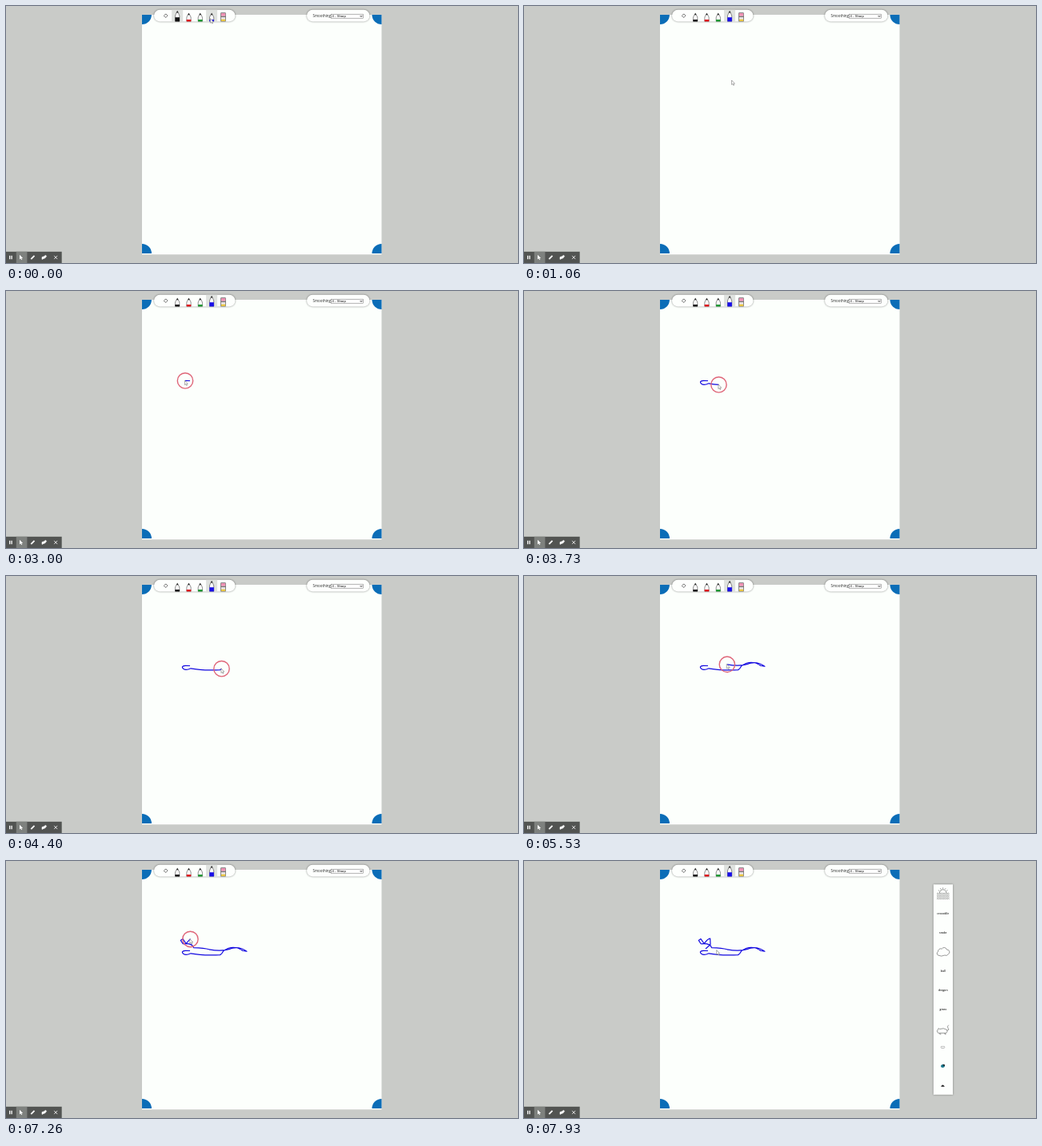
An HTML page that plays this animation: 640 by 322 pixels, repeating every 8 s.

```html
<!DOCTYPE html>
<html lang="en">
<head>
<meta charset="utf-8">
<title>Whiteboard sketch</title>
<style>
html, body { margin: 0; width: 100%; height: 100%; overflow: hidden; background: #c9cbc8; }
svg { display: block; width: 100vw; height: 100vh; }
.ui { font: 4.4px "Open Sans", sans-serif; fill: #222; }
.option { font: 4.2px "Liberation Sans", Arial, sans-serif; fill: #111; }
.word { font: 600 3.4px "Open Sans", sans-serif; fill: #222; text-anchor: middle; }
.shadow { filter: drop-shadow(0 .8px 1px #0007); }
.thin { fill: none; stroke: #444; stroke-width: .55; }
.ink { fill: none; stroke: #1208e0; stroke-width: 1.2; stroke-linejoin: round; }
</style>
</head>
<body>
<svg viewBox="0 0 640 322">
  <rect width="640" height="322" fill="#c9cbc8"/>
  <rect x="170" y="11" width="299.5" height="300.3" fill="#fcfffc"/>
  <g id="corners" fill="#0b6db7"></g>

  <rect class="shadow" x="185" y="4.8" width="101.5" height="14.6" rx="7.3" fill="#fdfffd"/>
  <g id="pens"></g>
  <g id="move" fill="none" stroke="#222" stroke-width=".7"></g>
  <g>
    <rect x="268.7" y="8.7" width="5.8" height="10.4" fill="#e9e4e6" stroke="#444" stroke-width=".6"/>
    <rect x="269" y="9" width="5.2" height="3.6" fill="#ef91b4"/>
    <rect x="268.6" y="12.8" width="6" height="1.1" fill="#666"/>
    <rect x="269" y="16.7" width="5.2" height="2.2" fill="#eac63c"/>
  </g>

  <rect class="shadow" x="376" y="4.8" width="78.5" height="14.6" rx="7.3" fill="#fdfffd"/>
  <text class="ui" x="383.6" y="14.3">Smoothing</text>
  <rect x="406.4" y="10.2" width="40.2" height="5" fill="#fff" stroke="#666" stroke-width=".5"/>
  <text class="option" x="407.6" y="14.2">4 - Sharp</text>
  <path d="M442.6 12l1.4 1.5 1.4-1.5" fill="none" stroke="#111" stroke-width=".8"/>

  <g>
    <rect y="307.8" width="69.7" height="14.2" fill="#525452"/>
    <rect x="12.8" y="307.8" width="13.6" height="14.2" fill="#7e817e"/>
    <path d="M4.7 312.7v4.6M7.1 312.7v4.6" stroke="#fff" stroke-width="1.3"/>
    <path d="M17 311.8v5.7l1.4-1.2 1 2 .9-.5-.9-1.9h1.7z" fill="#fff"/>
    <path d="M31.3 317.2l4.2-4.4" stroke="#fff" stroke-width="1.8"/>
    <path d="M45 317.4v-2.8l2.2-.7 2.4-1.6 1 1.2-1.6 2.2-2 .7z" fill="#fff" stroke="#fff" stroke-width=".6"/>
    <path d="M60.2 312.9l4 4.2M64.2 312.9l-4 4.2" stroke="#eee" stroke-width=".9"/>
  </g>

  <g id="panel">
    <rect class="shadow" x="511.8" y="29.3" width="24.3" height="263.5" fill="#fdfffd"/>
    <g class="thin">
      <path d="M519.5 40a4.2 4.2 0 0 1 8.4 0"/>
      <path id="rays"/>
      <path id="waves"/>
      <path d="M518 118.2a2.5 2.5 0 0 1-.4-4.6a3.4 3.4 0 0 1 4.7-3.5a3.4 3.4 0 0 1 6.2 1a3 3 0 0 1 2 5.5a4 4 0 0 1-4.8 1.5q-4 2-7.7.1z"/>
      <path d="M517 214.8q-1.5-2 .3-3.4q.5-3 2.2-.8q5-2 9 .8q1.5 2.5-.8 4.3h-9.5zM529 212.5q3.5-1 1-3.2q-1.5-2 .8-3.7M519.8 215.8v1.2h1.6M526 215.8v1.2h1.6M518.3 213h.5"/>
      <path d="M521.5 232.3h4l.5 1.3-1 .9h-3l-1-.8z" style="stroke:#888"/>
    </g>
    <path d="M521.2 256l2-1.3 2.5.3v3l-2 1-2.5-.7z" fill="#18758a"/>
    <path d="M523.5 254.7l2.4.4v2.1l-1.4-.6z" fill="#222"/>
    <path d="M521.2 282.8q2-4.5 4.7 0z" fill="#222"/>
    <g id="words"></g>
  </g>

  <g id="ink"></g>
  <circle id="press" r="9.7" fill="none" stroke="#df6578" stroke-width="1.4"/>
  <path id="cursor" d="M0-1v5.6l1.3-1 .9 1.9.9-.4-.9-1.9h1.7z" fill="#fff" stroke="#777" stroke-width=".6"/>
</svg>
<script>
const LOOP = 8000, STEP = LOOP / 120;
const SELECT_AT = 600, PANEL_AT = 7860;
const el = id => document.getElementById(id);
const repeat = (n, draw) => Array.from({ length: n }, (_, i) => draw(i)).join("");

// Each leg of the pointer's journey; the pen is down on the inked ones.
const legs = [
  { from: 600, to: 1060, d: "M256 16L260.8 105" },
  { from: 1260, to: 1800, d: "M260.8 105L231 112.5" },
  { name: "mouth", from: 2800, to: 3000, ink: true, d: "M230 112.5L224 112.4" },
  { name: "jaw", from: 3000, to: 4400, ink: true, d: "M224 112.4Q218 113 222 116.5Q225 118.5 231 115.8Q245 118.5 267.5 117.7L269.5 116.2" },
  { name: "tail", from: 4400, to: 5530, ink: true, d: "M269.5 116.2L272 112.5Q284 104 296 112.5L301 113.2Q292 107 283 109.2Q271 114 254 110.8" },
  { name: "back", from: 5530, to: 6600, ink: true, d: "M254 110.8Q248 109 234.5 108.6Q233 102.5 221.3 103.8" },
  { name: "ear", from: 6600, to: 7660, ink: true, d: "M221.3 103.8L218.3 99.5L221 97.6L225.2 103.5Q230 97 232.7 97.2L233 104.6L227 110" },
  { from: 7660, to: 7930, d: "M227 110L241.3 112" }
];

for (const leg of legs) {
  leg.path = document.createElementNS("http://www.w3.org/2000/svg", "path");
  leg.path.setAttribute("d", leg.d);
  leg.path.setAttribute("class", "ink");
  leg.length = leg.path.getTotalLength();
  if (leg.ink) el("ink").append(leg.path);
}

function pen(x, color, selected, lit) {
  const tip = selected ? 6 : 8.8, shoulder = selected ? 12 : 14, cap = selected ? 14.2 : 17;
  return (lit ? `<rect x="${x - 7}" y="4.8" width="14" height="14.6" fill="#dfe2df"/>` : "") +
    `<path d="M${x - 2.6} 19.2V${shoulder}L${x - .6} ${tip + 1.2}h1.2L${x + 2.6} ${shoulder}V19.2z" fill="#fff" stroke="#444" stroke-width=".6"/>` +
    `<path d="M${x - 1.2} ${tip + 2.4}L${x} ${tip - .3}L${x + 1.2} ${tip + 2.4}z" fill="#222"/>` +
    `<rect x="${x - 2.8}" y="${cap}" width="5.6" height="${19.4 - cap}" fill="${color}"/>`;
}

function pens(blue) {
  return ["#111", "#e0131c", "#229a35", "#1a10e8"].map((color, i) =>
    pen(214.2 + 14.3 * i, color, i === (blue ? 3 : 0), i === 3 || (i === 0 && !blue))).join("");
}

el("corners").innerHTML = repeat(4, i => {
  const right = i % 2, bottom = i > 1;
  return `<path transform="translate(${right ? 469.5 : 170} ${bottom ? 310 : 11}) rotate(${bottom ? 180 + 90 * !right : 90 * right})" d="M0 0H12A12 12 0 0 1 0 12z"/>`;
});
el("move").innerHTML = repeat(4, i =>
  `<path transform="translate(199.7 12.2) rotate(${90 * i})" d="M-1.1-1.2L0-2.3L1.1-1.2"/>`);
el("rays").setAttribute("d", repeat(5, i => {
  const a = Math.PI * (i + 1) / 6, c = Math.cos(a), s = Math.sin(a);
  return `M${523.7 + 5.2 * c} ${40 - 5.2 * s}l${1.5 * c} ${-1.5 * s}`;
}));
el("waves").setAttribute("d", repeat(4, i => `M516 ${41 + 2.2 * i}` + "q1.3-1.5 2.6 0".repeat(6)));
el("words").innerHTML = ["crocodile", "snake", "", "ball", "dragon", "grass"].map((word, i) =>
  `<text class="word" x="523.8" y="${67 + 23.9 * i}">${word}</text>`).join("");

const toolbars = [pens(false), pens(true)];
let shownToolbar = -1;

function show(id, visible) {
  el(id).style.display = visible ? "" : "none";
}

function render(time) {
  const t = Math.floor((time % LOOP + 5) / STEP) * STEP % LOOP;
  const progress = leg => Math.max(0, Math.min(1, (t - leg.from) / (leg.to - leg.from)));

  const blue = +(t >= SELECT_AT);
  if (blue !== shownToolbar) el("pens").innerHTML = toolbars[shownToolbar = blue];

  for (const leg of legs.filter(l => l.ink)) {
    const done = progress(leg);
    leg.path.style.visibility = done ? "visible" : "hidden";
    leg.path.style.strokeDasharray = done < 1 ? `${done * leg.length} 999` : "none";
  }

  const current = legs.findLast(l => t >= l.from) || legs[0];
  const { x, y } = current.path.getPointAtLength(progress(current) * current.length);
  el("press").setAttribute("transform", `translate(${x} ${y})`);
  el("cursor").setAttribute("transform", `translate(${x - .6} ${y + .6})`);
  show("press", current.ink);
  show("panel", t >= PANEL_AT);
}

const start = performance.now();
function tick() {
  render(performance.now() - start);
  requestAnimationFrame(tick);
}
tick();
</script>
</body>
</html>
```
